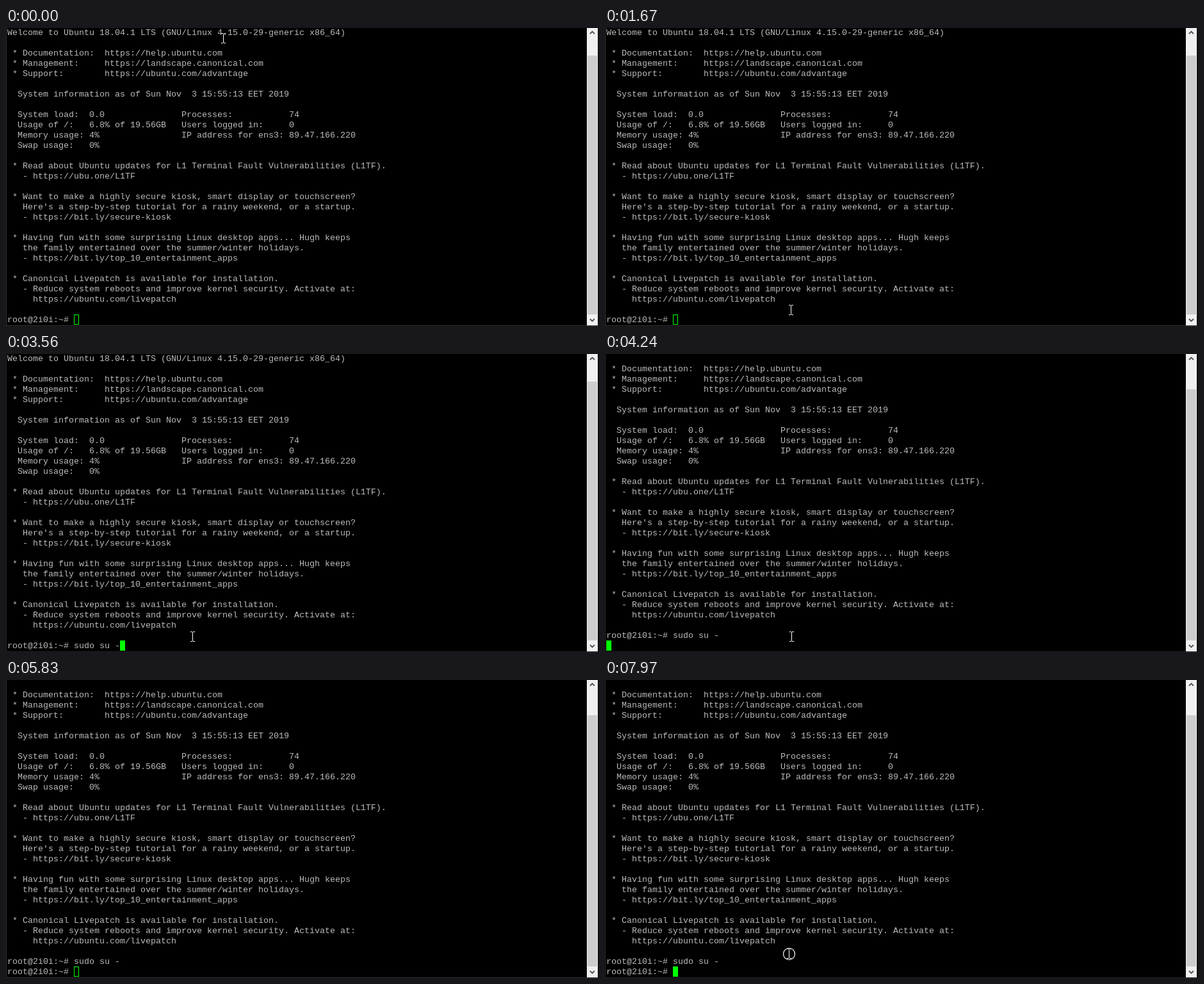
An HTML page that plays this animation: 926 px wide and 465 px high, repeating every 8000 ms.

```html
<!DOCTYPE html>
<html lang="en">
<head>
<meta charset="utf-8">
<title>Terminal session</title>
<style>
  html, body { margin: 0; width: 100%; height: 100%; overflow: hidden; background: #000; }
  svg { display: block; width: 926px; height: 465px; }
  text { font: 13.333px "Liberation Mono", monospace; fill: #bbb; white-space: pre; }
</style>
</head>
<body>
<svg viewBox="0 0 926 465" shape-rendering="crispEdges">
  <rect width="926" height="465"/>
  <g id="lines"></g>
  <rect id="caret" stroke="#0f0"/>
  <path id="border" d="M.5 0V464.5H924.5V0" fill="none"/>
  <rect x="907" width="17" height="464" fill="#f0f0f0"/>
  <rect id="thumb" x="908" width="15" fill="#cdcdcd"/>
  <path d="M912 9l3.5-3.5 3.5 3.5M912 454l3.5 3.5 3.5-3.5" fill="none" stroke="#505050" stroke-width="1.8" shape-rendering="auto"/>
  <g id="pointer">
    <path d="M-3-8h3v1h1v-1h3v1h-3v14h3v1h-3v-1h-1v1h-3v-1h3v-14h-3z" fill="#fff"/>
    <circle id="ring" cx=".5" cy=".5" r="9" fill="none" stroke="#fff" stroke-width="1.2" shape-rendering="auto"/>
  </g>
</svg>
<script>
const LOOP = 8000, ROW = 16, COL = 8, LEFT = 2, TOP = -1, LAST_ROW = 28;
const PROMPT = 'root@2i0i:~# ', COMMAND = 'sudo su -';
const FOCUS = 2670, PASTE = 2730, ENTER = 4240, SHELL = 4330, BLUR = 5830, REFOCUS = 7880;

const banner = `Welcome to Ubuntu 18.04.1 LTS (GNU/Linux 4.15.0-29-generic x86_64)

 * Documentation:  https://help.ubuntu.com
 * Management:     https://landscape.canonical.com
 * Support:        https://ubuntu.com/advantage

  System information as of Sun Nov  3 15:55:13 EET 2019

  System load:  0.0               Processes:           74
  Usage of /:   6.8% of 19.56GB   Users logged in:     0
  Memory usage: 4%                IP address for ens3: 89.47.166.220
  Swap usage:   0%

 * Read about Ubuntu updates for L1 Terminal Fault Vulnerabilities (L1TF).
   - https://ubu.one/L1TF

 * Want to make a highly secure kiosk, smart display or touchscreen?
   Here's a step-by-step tutorial for a rainy weekend, or a startup.
   - https://bit.ly/secure-kiosk

 * Having fun with some surprising Linux desktop apps... Hugh keeps
   the family entertained over the summer/winter holidays.
   - https://bit.ly/top_10_entertainment_apps

 * Canonical Livepatch is available for installation.
   - Reduce system reboots and improve kernel security. Activate at:
     https://ubuntu.com/livepatch
`.split('\n');

const $ = id => document.getElementById(id);
const set = (el, attrs) => { for (const k in attrs) el.setAttribute(k, attrs[k]); };
const rowTop = row => TOP + row * ROW;

const rows = Array.from({ length: LAST_ROW + 1 }, (_, i) => {
  const el = document.createElementNS('http://www.w3.org/2000/svg', 'text');
  set(el, { x: LEFT, y: rowTop(i) + 12 });
  return $('lines').appendChild(el);
});

const step = (t, start, end, count) =>
  Math.min(1, Math.floor((t - start) / (end - start) * (count - 1) + 1e-6) / (count - 1));
const mix = (a, b, p) => Math.round(a + (b - a) * p);
const path = (x0, y0, x1, y1, p) => [mix(x0, x1, p), mix(y0, y1, p)];
const easeOut = p => 1 - (1 - p) ** 2;

function pointerAt(t) {
  if (t < 60) return [339, 16];
  if (t < 240) return path(339, 16, 181, 175, step(t, 60, 240, 3) + .5);
  if (t < 1020) return null;
  if (t < 3260) return path(3, 338, 290, 440, easeOut(step(t, 1020, 1670, 9)));
  if (t < 3340) return [290, 441];
  if (t < 3560) return [290, 440];
  if (t < 4510) return [291, 441];
  if (t < 4820) return [292, 441];
  if (t < 5050) return path(292, 441, 91, 437, ((step(t, 4820, 5050, 4) * 3 + 1) / 3) ** 1.5);
  if (t < 6980) return null;
  const p = step(t, 6980, 7320, 5);
  const [x, y] = path(62, 434, 288, 427, easeOut(p));
  return [t < 7970 ? x : 287, y - Math.round(5 * Math.sin(Math.PI * p))];
}

function screenAt(t) {
  const line = PROMPT + (t >= PASTE ? COMMAND : '');
  if (t < ENTER) return [...banner, line];
  return [...banner.slice(1), line, t < SHELL ? '' : PROMPT];
}

function draw(t) {
  const screen = screenAt(t);
  rows.forEach((el, i) => {
    if (el.textContent !== screen[i]) el.textContent = screen[i];
  });

  const focused = t >= FOCUS && t < BLUR || t >= REFOCUS;
  set($('caret'), {
    x: LEFT + screen[LAST_ROW].length * COL + .5, y: rowTop(LAST_ROW) + .5,
    width: COL - 1, height: ROW - 1, fill: focused ? '#0f0' : 'none'
  });
  set($('border'), { stroke: focused ? '#262626' : '#333' });

  const thumbTop = t < ENTER ? 43 : 55;
  set($('thumb'), { y: thumbTop, height: 447 - thumbTop });

  const at = pointerAt(t);
  const clicked = t >= FOCUS && t < PASTE || t >= REFOCUS;
  set($('pointer'), { visibility: at ? 'visible' : 'hidden' });
  if (at) set($('pointer'), { transform: `translate(${at})` });
  set($('ring'), { opacity: clicked ? 1 : 0 });
}

const begin = performance.now();
function tick() {
  draw((performance.now() - begin) % LOOP);
  requestAnimationFrame(tick);
}
tick();
</script>
</body>
</html>
```
